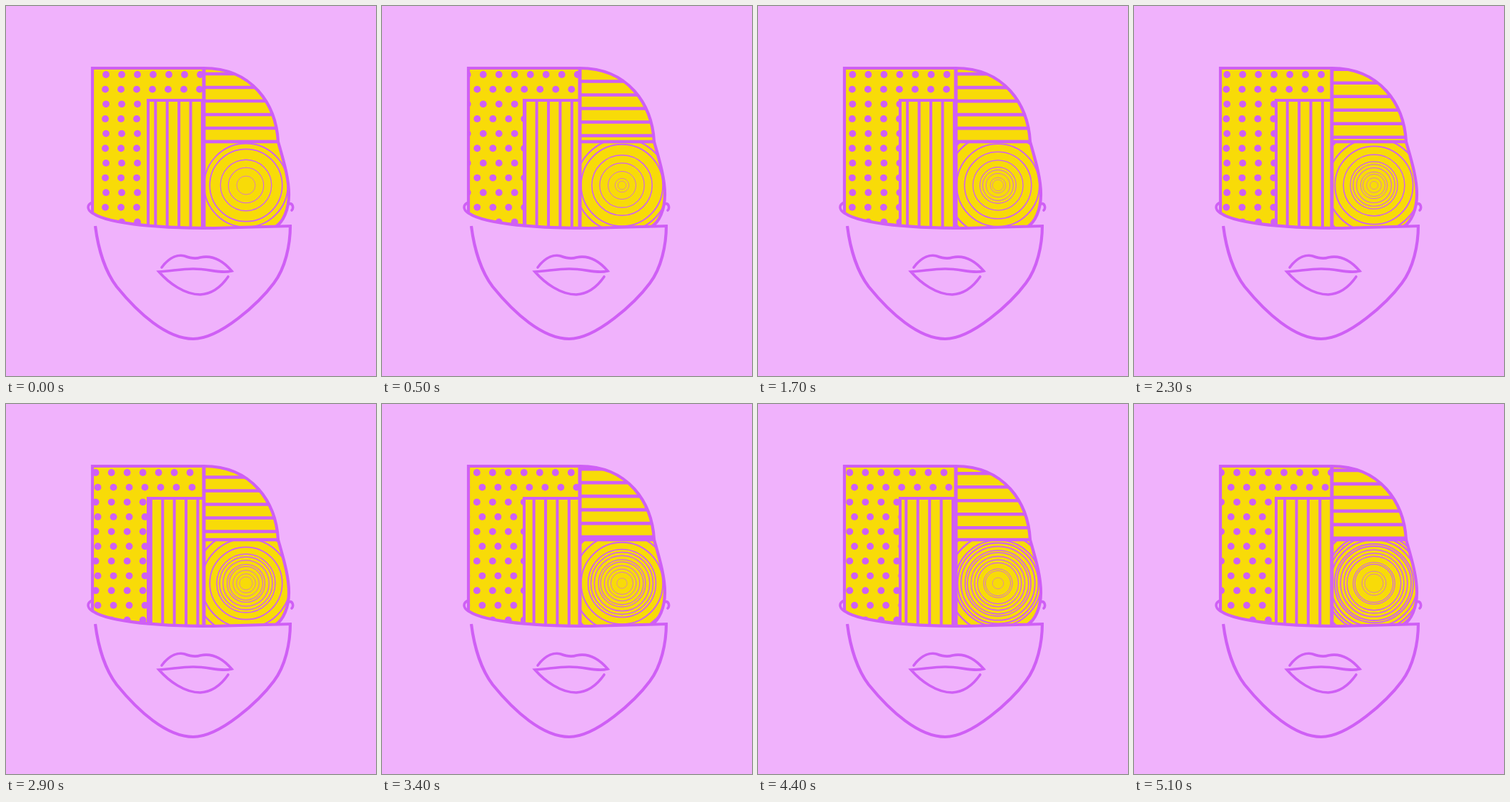
These frames come from a looping animation (518x518 px, 5200 ms). An HTML page with a canvas:

```html
<!DOCTYPE html>
<html lang="en">
<head>
<meta charset="utf-8">
<title>Patterned head</title>
<style>
html, body { margin: 0; width: 100%; height: 100%; overflow: hidden; background: #f0b2fc; }
canvas { display: block; width: 100vw; height: 100vh; }
</style>
</head>
<body>
<canvas id="stage" width="518" height="518"></canvas>
<script>
const ctx = document.getElementById('stage').getContext('2d');
const PINK = '#f0b2fc', YELLOW = '#f8db08', PURPLE = '#cf5ff5';
const STEP = 100, STEPS = 52, CYCLE = 26;

// Pattern timing within a cycle: [step, eased step]
const EASE = [[0, 0], [3, 3.4], [9, 7.6], [13, 11.3], [17, 17.4], [CYCLE, CYCLE]];
// Steps at which the rings leave the centre; all grow at the same speed
const BIRTHS = [-45, -39, -27.5, -19, -10, -2.5, .5, 4.2, 8.6, 11, 15, 18.7, 22, 28.5, 30.5, 38, 41];
const GROWTH = 1.3;

const DOME = 'C345 87 378 138 381 190 C388 215 396 240 396 264 C396 285 388 303 377 309';
const BRIM = 'C135 303 200 311 290 311 L400 308';
const head = new Path2D(`M121 87 H277 ${DOME} L290 311 C200 311 140 305 121 290 Z`);
const outline = new Path2D(`M121 290 V87 H277 ${DOME} M119 288 ${BRIM}`);
const ears = new Path2D('M121 275 C113 278 113 285 121 290 M395 277 C402 275 403 283 400 286');
const jaw = new Path2D('M125 308 C129 340 139 372 155 393 C185 430 225 466 262 466 ' +
  'C300 466 355 415 375 388 C391 367 398 335 398 307');
const lips = new Path2D('M218 366 C230 350 242 348 250 350 C258 353 266 354 272 352 ' +
  'C290 348 305 358 316 371 C300 375 285 368 262 368 C245 368 232 371 214 372 ' +
  'C228 388 250 404 272 404 C290 403 302 392 311 379');

// Eased share of the cycle, 0 to 1
function progress(n) {
  const m = n % CYCLE;
  const i = EASE.findIndex(([step]) => step > m);
  const [m0, e0] = EASE[i - 1], [m1, e1] = EASE[i];
  return (e0 + (e1 - e0) * (m - m0) / (m1 - m0)) / CYCLE;
}

// Positions of a pattern that repeats between two bounds
function* repeat(pos, period, low, high) {
  let p = pos + Math.ceil((low - pos) / period) * period;
  for (; p < high; p += period) yield p;
}

function panel(x, y, w, h, draw) {
  ctx.save();
  ctx.beginPath();
  ctx.rect(x, y, w, h);
  ctx.clip();
  ctx.fillStyle = YELLOW;
  ctx.fillRect(x, y, w, h);
  ctx.fillStyle = PURPLE;
  draw();
  ctx.restore();
}

function line(x1, y1, x2, y2, width) {
  ctx.lineWidth = width;
  ctx.beginPath();
  ctx.moveTo(x1, y1);
  ctx.lineTo(x2, y2);
  ctx.stroke();
}

function circle(x, y, r) {
  ctx.beginPath();
  ctx.arc(x, y, r, 0, Math.PI * 2);
}

// Even rows run left, odd rows run right
function dots(p) {
  const gap = 22;
  for (let row = 0; row < 11; row++) {
    const start = row % 2 ? 139 + 4 * gap * p : 140 - 5 * gap * p;
    for (const x of repeat(start, gap, 114, 284)) {
      circle(x, 96 + row * 20.65, 4.9);
      ctx.fill();
    }
  }
}

function bars(p) {
  const gap = 16.4;
  for (const x of repeat(209.3 - 3 * gap * p, gap, 196, 282)) line(x, 130, x, 312, 4);
}

function stripes(p) {
  const gap = 19;
  for (const y of repeat(95 + 3 * gap * p, gap, 84, 195)) line(277, y, 400, y, 4.6);
}

function rings(n) {
  for (const birth of BIRTHS) {
    const r = GROWTH * (n - birth);
    if (r < 5) continue;
    ctx.lineWidth = .4 + r * .026;
    circle(336, 251, r);
    ctx.stroke();
  }
}

function draw(n) {
  const p = progress(n);
  ctx.fillStyle = PINK;
  ctx.fillRect(0, 0, 518, 518);
  ctx.strokeStyle = PURPLE;
  ctx.lineCap = 'butt';

  ctx.save();
  ctx.clip(head);
  panel(121, 87, 156, 225, () => dots(p));
  panel(199, 132, 78, 180, () => bars(p));
  panel(277, 87, 124, 103, () => stripes(p));
  panel(277, 190, 124, 122, () => rings(n));
  line(199, 130, 199, 312, 4);
  line(197, 132, 277, 132, 4);
  line(277, 87, 277, 312, 5);
  line(277, 190, 400, 190, 4.6);
  ctx.restore();

  ctx.lineWidth = 4.2;
  ctx.stroke(outline);
  ctx.stroke(jaw);
  ctx.lineWidth = 3.6;
  ctx.lineCap = 'round';
  ctx.stroke(ears);
  ctx.stroke(lips);
}

const begin = performance.now();
function tick() {
  const t = performance.now() - begin;
  draw(Math.floor(t / STEP) % STEPS);
  requestAnimationFrame(tick);
}
tick();
</script>
</body>
</html>
```
